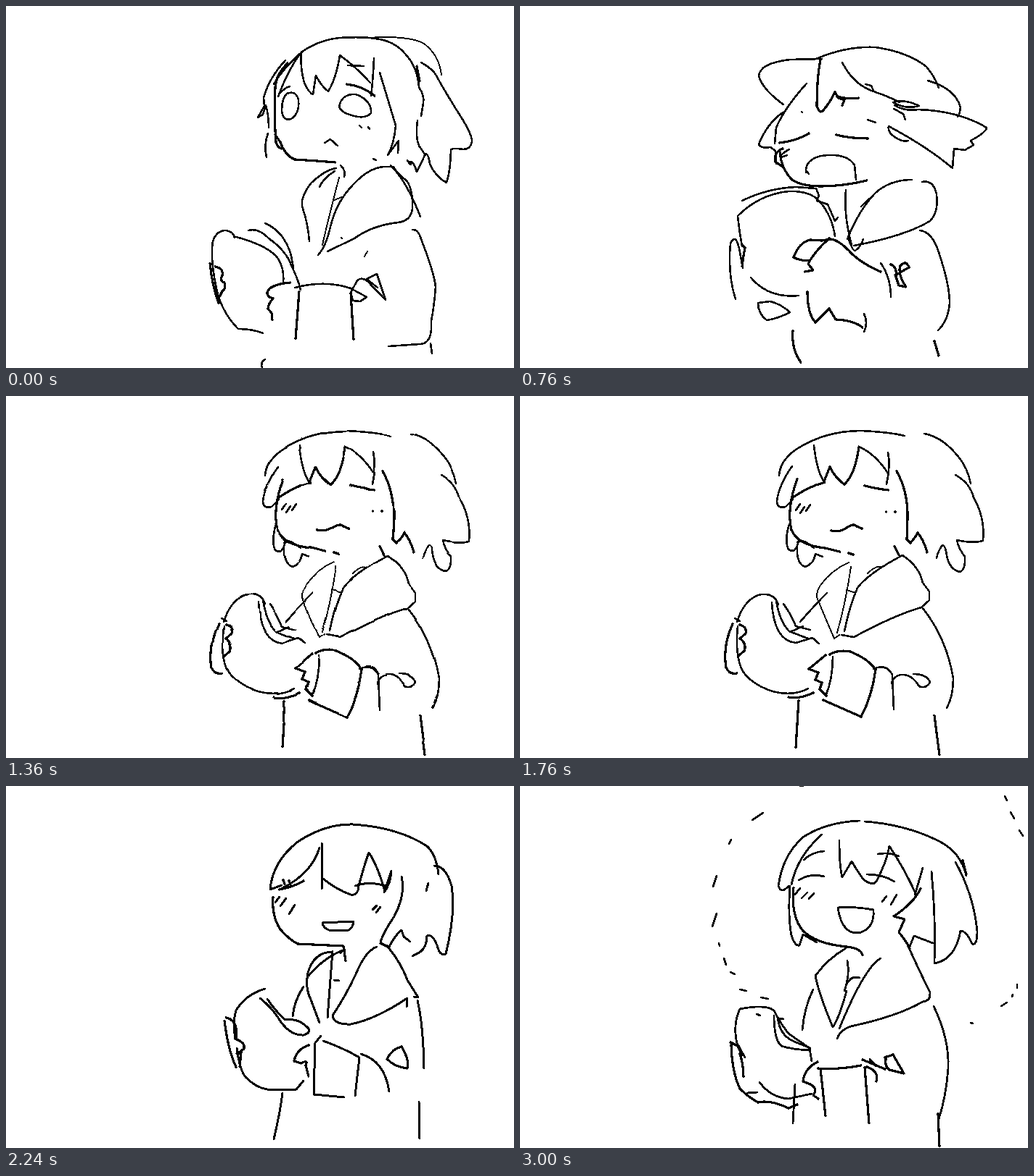
These frames come from a looping animation (700 px wide and 500 px high, 3120 ms). An HTML page without scripts:

```html
<!DOCTYPE html>
<html lang="en">
<head>
<meta charset="utf-8">
<title>Snack time</title>
<style>
html, body { margin: 0; width: 100%; height: 100%; overflow: hidden; background: #fff; }
svg { display: block; width: 700px; height: 500px; }
path { fill: none; stroke: #000; stroke-width: 2.6; stroke-linecap: round; stroke-linejoin: round; shape-rendering: crispEdges; }
#smile path { stroke-width: 3; }
#joy path { stroke-width: 2.8; }
path.b, #smile path.b, #joy path.b { stroke-width: 3.2; }
.t { stroke-width: 1.9; }

/* every drawing is held, then cut: step-end throughout */
#art, .pose, .chew, .burst { animation: 3.12s step-end infinite; }
.pose, .chew, .burst { opacity: 0; }
#art { animation-name: boil; }
#look { animation-name: look; }
#bite { animation-name: bite; }
#munch { animation-name: munch; }
#smile { animation-name: smile; }
#joy { animation-name: joy; }
#chew1 { animation-name: chew1; }
#chew2 { animation-name: chew2; }
#near { animation-name: near; transform-origin: 470px 180px; }
#far { animation-name: far; transform-origin: 480px 165px; }

@keyframes look { 0% { opacity: 1 } 16.666%, 100% { opacity: 0 } }
@keyframes bite { 0% { opacity: 0 } 16.666% { opacity: 1 } 32.051%, 100% { opacity: 0 } }
@keyframes munch { 0% { opacity: 0 } 32.051% { opacity: 1 } 64.102%, 100% { opacity: 0 } }
@keyframes smile { 0% { opacity: 0 } 64.102% { opacity: 1 } 75.641%, 100% { opacity: 0 } }
@keyframes joy { 0% { opacity: 0 } 75.641%, 100% { opacity: 1 } }
@keyframes chew1 { 0%, 39.743%, 56.41%, 100% { opacity: 0 } 32.051%, 48.717% { opacity: 1 } }
@keyframes chew2 { 0%, 48.717%, 64.102%, 100% { opacity: 0 } 39.743%, 56.41% { opacity: 1 } }
@keyframes near {
  0% { opacity: 0; transform: none }
  75.641% { opacity: 1; transform: scale(.94) }
  80.769% { opacity: 1; transform: none }
  84.615% { opacity: 1; transform: scale(1.15) }
  88.461%, 100% { opacity: 0; transform: none }
}
@keyframes far {
  0% { opacity: 0; transform: none }
  88.461% { opacity: 1; transform: scale(.88) }
  92.307% { opacity: 1; transform: scale(.94) }
  96.153%, 100% { opacity: 1; transform: none }
}
/* line wobble on every second drawing, eight per second */
@keyframes boil {
  0%, 7.692%, 16.666%, 24.358%, 32.051%, 39.743%, 48.717%, 56.41%, 64.102%, 71.794%, 80.769%, 88.461%, 96.153%, 100% { filter: none }
  3.846%, 11.538%, 20.512%, 28.205%, 35.897%, 43.589%, 52.564%, 60.256%, 67.948%, 75.641%, 84.615%, 92.307% { filter: url(#wobble) }
}
</style>
</head>
<body>
<svg viewBox="0 0 700 500" xmlns="http://www.w3.org/2000/svg">
<filter id="wobble" filterUnits="userSpaceOnUse" x="0" y="0" width="700" height="500" color-interpolation-filters="sRGB">
  <feTurbulence type="fractalNoise" baseFrequency=".015" seed="4" result="n"/>
  <feDisplacementMap in="SourceGraphic" in2="n" scale="7" xChannelSelector="R" yChannelSelector="G"/>
</filter>

<g id="art">
<g id="look" class="pose">
  <!-- hair -->
  <path d="M369 108Q382 86 407 64Q430 47 460 44Q490 42 509 45Q535 48 550 66Q567 84 569 112Q577 124 575 134L572 152M567 158Q564 180 569 193L578 206M572 78Q590 88 594 98Q607 122 630 158Q643 180 642 188Q640 198 630 198Q618 196 613 198Q613 225 607 244Q592 236 584 218Q582 204 578 204Q572 218 566 229Q562 215 557 215Q560 224 553 213"/>
  <path class="t" d="M509 43Q560 42 576 52Q597 68 600 95"/>
  <path d="M385 75Q362 100 355 127L356 138L347 154L354 150L358 137Q362 150 362 168M361 176Q355 192 359 209M407 63Q405 85 411 106Q418 121 423 122L427 96Q434 110 444 118Q455 100 460 68Q480 82 502 106M471 82L493 83M507 72Q506 100 503 124M405 66Q388 90 375 125M377 121Q384 113 391 111M515 92Q525 125 537 165Q535 190 526 206L541 186L540 203"/>
  <path class="b" d="M388 79Q372 95 371 112Q369 150 372 188Q374 196 380 197M566 83L570 104M469 108Q490 110 508 124M371 178L378 188Q384 206 398 212Q430 214 454 216"/>
  <!-- face -->
  <path d="M387 121Q400 116 403 130Q405 148 393 156Q382 160 380 145Q380 127 387 121M460 135Q465 121 482 122Q504 130 503 148Q495 156 480 152Q456 146 460 135M487 165L490 168M499 167L501 170M439 189L447 184L457 193M461 220Q469 228 466 236M506 211L510 213"/>
  <!-- hood -->
  <path d="M455 224Q440 226 420 245Q404 266 409 280Q416 300 418 325M453 228Q437 238 432 250M430 344Q441 332 447 305Q455 270 480 245Q500 224 520 222L534 222Q540 233 552 241Q561 254 560 280Q558 297 540 299Q505 303 480 321L443 339M530 220Q552 242 571 291"/>
  <path class="t" d="M459 237Q445 290 436 330M453 268L462 264M462 320L463 321M494 346L498 339"/>
  <!-- body and bread -->
  <path d="M560 309Q568 308 572 322Q590 368 592 388Q590 415 586 435Q588 467 570 467L527 470M585 466L587 480M354 452Q340 446 320 446Q299 425 291 395Q281 350 285 325Q290 310 303 310Q314 312 315 320M317 319Q355 329 372 345Q384 360 382 382M334 310Q348 306 362 321Q386 338 393 358Q402 376 406 392M357 300Q384 312 393 345L396 362"/>
  <path class="b" d="M281 355Q284 387 293 410M288 360Q300 362 298 372Q294 380 301 382Q304 390 298 394L295 400M392 382Q375 383 365 389Q356 396 363 402L368 404Q361 412 361 418L366 424L367 434M404 394L399 460M475 396L479 461"/>
  <path d="M398 389Q440 378 475 390L497 402L488 408L478 407L475 396L484 379Q490 374 498 380L523 406L511 370L497 377L512 389M357 488Q350 492 353 500"/>
</g>

<g id="bite" class="pose">
  <!-- hair and hat -->
  <path d="M363 136Q335 116 329 97Q330 79 372 74L416 73M408 73Q450 55 490 57Q536 64 560 84Q572 98 577 113M562 103Q600 114 607 140Q606 150 603 153M444 78Q460 110 490 119Q510 126 523 133M514 133Q530 128 550 138Q530 143 514 133M476 108L484 110L487 117M516 137Q530 146 549 143Q605 145 643 168Q643 174 621 186L625 192L613 199L598 197L596 224Q562 195 508 166Q506 175 518 182Q527 188 535 186M515 142L528 149L531 157"/>
  <path class="b" d="M414 74Q409 100 409 138Q413 150 418 144Q428 132 434 119L439 127L447 130L444 137M437 125Q450 129 467 127"/>
  <path d="M395 107Q365 140 353 168L351 190M362 147Q340 163 329 191Q331 197 345 195L352 200L353 218M371 198Q358 205 360 209L368 206"/>
  <!-- face -->
  <path class="b" d="M357 189Q380 187 398 176M436 178Q455 183 480 183M362 197Q349 202 352 215L363 223M358 201Q360 225 375 240Q388 249 415 249Q445 249 478 241"/>
  <path d="M394 230Q393 212 415 207Q450 202 461 220L463 240M394 227L398 232M388 146L389 147M479 157L490 161"/>
  <!-- hood and body -->
  <path d="M449 254Q446 290 457 330M451 322Q468 280 490 258Q510 240 540 240M554 243Q570 240 574 260Q577 285 565 297Q530 318 460 331M452 320Q458 338 462 338Q470 332 473 322M470 277L481 266M551 310Q568 312 577 340Q592 385 592 410Q590 435 576 448"/>
  <path class="b" d="M571 463L577 483M376 448Q374 475 387 492"/>
  <!-- bread and hands -->
  <path d="M306 269Q340 252 380 250L408 252L412 262L409 269L424 274L434 297L438 292M306 332Q302 310 300 290Q330 260 370 256Q400 255 413 270Q430 290 434 318M318 375Q342 404 384 400M297 405Q286 370 290 328Q297 313 302 335L307 362M328 410L345 408Q360 412 372 423Q355 432 340 434Q328 425 328 410"/>
  <path class="b" d="M306 330L310 334L308 345L306 360M400 352Q385 352 377 347Q385 326 400 323L416 324L428 322M426 321Q405 340 397 356L404 365L392 367M428 322Q440 323 458 343Q475 358 497 367M396 394Q396 425 407 437L426 418L435 433Q460 434 472 444M511 357Q520 360 518 374L522 386L532 388Q520 370 524 359Q532 350 536 361L517 372"/>
  <path d="M497 355Q511 375 511 402M474 425Q480 438 474 450"/>
</g>

<g id="munch" class="pose">
  <!-- hair -->
  <path d="M357 110Q358 90 380 74Q420 48 470 48Q510 50 530 55M557 52Q582 56 605 85Q617 100 621 121M600 109Q620 120 625 140Q641 168 638 200Q625 204 602 199Q604 210 613 222Q614 240 606 243Q592 240 588 220Q586 206 582 206Q576 214 574 224M375 97Q357 122 354 145Q354 156 366 153L376 143M371 177Q364 200 370 212Q380 219 384 200M382 210Q381 232 393 236Q405 232 407 218L417 222M382 202Q390 196 405 210"/>
  <path class="b" d="M519 104Q535 132 534 170L533 198L538 203Q545 195 548 189Q556 198 561 216M382 115Q367 155 374 185Q383 206 420 210L441 215M376 140Q400 124 418 120L427 98Q435 114 447 122Q462 108 467 70M475 124Q490 128 508 130M516 208L522 219"/>
  <path d="M405 68Q409 105 420 120M467 70Q490 80 508 108M507 78Q511 95 505 122M380 158L386 149M386 162L392 153M394 159L400 150"/>
  <path class="b" d="M504 160L505 160M516 160L518 160M453 217L459 219"/>
  <!-- hood and body -->
  <path class="t" d="M453 230Q430 240 415 260Q405 274 412 285Q420 305 433 335L440 330M456 236Q449 285 437 327M450 268L460 271M479 245Q490 234 497 236"/>
  <path d="M447 325Q454 290 465 265Q480 245 527 220Q550 235 555 258L564 270L564 282L553 292Q515 303 460 333L443 330M555 293Q588 335 597 390Q597 415 588 431M386 312Q405 290 423 272"/>
  <!-- bread -->
  <path d="M299 312Q308 283 328 275Q350 270 356 288M300 318Q296 360 307 380Q318 397 345 407Q375 416 397 404M347 285Q348 310 357 326Q365 339 380 341L403 334L412 342M353 283Q358 312 371 325L397 335M363 287Q375 304 380 318L400 323M372 326L390 318M296 307L303 311"/>
  <!-- hands and sleeves -->
  <path class="b" d="M293 315Q279 345 284 375Q288 385 299 383M303 316Q313 319 311 328L303 335Q313 342 309 352L302 358M421 358L398 377L411 382L407 392L416 396L413 405L422 414M427 357Q438 350 455 353Q480 363 490 378Q485 415 470 443L418 420M370 416Q385 419 404 410"/>
  <path d="M431 360Q431 390 422 412M487 377Q505 369 513 385L515 433M512 397Q514 387 525 385Q540 384 550 401Q560 405 565 395Q560 384 542 384"/>
  <g id="chew1" class="chew"><path class="b" d="M430 179Q437 186 444 185Q454 174 460 179L469 182M385 420L376 482M570 441Q575 465 573 494"/></g>
  <g id="chew2" class="chew"><path class="b" d="M429 186Q440 189 450 182Q460 175 464 180L471 183M384 420L380 486M571 441L578 496"/></g>
</g>

<g id="smile" class="pose">
  <!-- hair -->
  <path d="M364 143Q367 105 402 77Q440 52 478 53Q540 57 580 83Q593 95 596 122M590 110Q606 110 614 138Q620 175 606 232Q598 236 594 220Q588 204 580 207Q580 222 571 229L560 235M545 125Q551 150 535 180Q517 207 516 217L528 222Q536 206 545 199L548 208L557 215M364 143L380 137M582 134L579 145"/>
  <path d="M381 141Q422 120 432 85M435 79L435 142M437 128Q455 143 475 150Q485 152 486 138Q495 105 500 92Q512 110 522 145L531 117Q530 135 521 147M481 138Q500 131 523 138"/>
  <path class="b" d="M376 143Q395 140 410 131M382 130L384 135M390 131L392 136"/>
  <!-- face -->
  <path d="M377 153L371 161M386 155L378 166M398 164L390 177M511 165L505 171M516 167L510 175"/>
  <path class="b" d="M368 153Q366 180 378 198Q390 212 402 218L465 221L468 242M466 226L461 230M516 217L528 223"/>
  <path d="M436 189L479 187Q478 196 472 199L445 199Q437 196 436 189"/>
  <!-- hood and body -->
  <path d="M467 226Q440 235 417 262M449 229Q424 230 416 258Q412 280 420 295L432 327M450 228L443 320M511 222Q495 228 482 260Q468 290 450 317Q452 330 475 329Q510 322 553 293L552 305M526 222Q545 245 553 268L568 292L562 291M567 296Q575 330 576 390M452 268L459 269M410 277Q397 297 395 318M569 436L570 487M381 424Q378 450 369 488"/>
  <!-- bread and hands -->
  <path d="M357 280Q330 288 317 310Q312 325 316 350M350 293Q366 306 375 320Q390 345 410 344Q420 341 417 335Q404 320 385 323Q372 312 360 294M318 362Q322 392 330 402Q345 417 360 419L400 419L410 407"/>
  <path class="b" d="M301 324Q306 365 317 388M303 320Q315 322 317 335L318 350Q330 355 328 363L318 370L324 368L322 388M417 358Q400 364 397 380L407 383Q417 377 413 386L417 401"/>
  <path d="M434 345L426 355L424 426L466 430M437 352Q465 362 487 375L481 428M489 370Q522 380 528 422"/>
  <path class="b" d="M525 377Q532 363 545 360Q556 378 553 390Q535 388 525 377"/>
</g>

<g id="joy" class="pose">
  <!-- hair -->
  <path d="M388 72Q420 50 468 48M475 49Q530 53 575 75Q607 90 615 124M600 105Q625 150 630 200Q630 221 623 218Q615 200 607 200Q600 240 571 245Q573 180 567 118M390 71Q362 95 356 138Q360 150 370 138M416 67Q382 97 374 136M372 138Q369 180 374 206Q379 222 385 220L390 205L409 216"/>
  <path d="M440 75Q440 110 444 126L457 104Q465 118 473 129Q488 140 492 130Q505 105 509 83Q530 115 545 148M555 113Q548 138 544 150M537 222L543 207L569 217"/>
  <path class="b" d="M552 142Q542 162 515 180L530 184L522 202Q532 214 537 224M377 140Q373 180 390 200Q408 218 450 222Q470 224 472 234M610 103L615 122"/>
  <!-- face -->
  <path d="M384 130Q400 120 419 125M478 122Q500 122 516 132M391 102Q403 91 419 90M493 94Q508 91 522 97M386 141L379 150M396 147L388 155M405 148L398 156M505 152L499 160M519 150L511 164"/>
  <path d="M438 168Q460 166 487 171Q489 195 470 202Q444 208 438 168"/>
  <!-- hood and body -->
  <path d="M449 224Q425 238 407 262Q411 285 431 333Q440 320 450 283M497 238Q475 250 440 335M451 241Q455 262 447 283M450 274Q456 261 468 265M533 217Q550 255 565 285Q566 297 555 298Q520 318 460 331Q442 335 437 349M404 281Q392 305 389 337M570 304Q592 350 590 390Q587 430 577 460"/>
  <path class="b" d="M576 452L578 498"/>
  <!-- bread and hands -->
  <path d="M303 308Q338 301 350 310Q357 325 370 342L399 362L402 380M303 308Q293 330 299 355L310 375M350 317Q350 350 360 359Q375 364 400 365M355 320Q358 345 378 353L400 362M357 321L363 322M326 315L331 317M330 409Q345 430 370 432L402 425M313 424L327 423M379 412L376 466"/>
  <path class="b" d="M290 354L300 359L306 372M291 357Q292 395 303 418Q315 430 328 437Q345 433 370 445L382 440M303 370Q308 385 308 402M410 381Q392 390 390 408L400 412Q411 418 404 427L411 432"/>
  <path class="b" d="M414 390L421 456M410 390Q440 392 470 386M475 388L481 466M472 378L503 391M482 378L490 386M478 388Q495 394 491 408"/>
  <path class="b" d="M503 375L514 371L529 397L509 392Q501 386 505 374"/>
</g>
</g>

<g id="near" class="burst">
  <path class="b" d="M285 104L291 113M270 157L270 170M258 218L264 220M300 206L296 222M312 235L309 244M333 255L337 267M310 53L312 61M330 38L336 46M353 14L359 28M407 5L413 12M446 5L447 11M493 5L494 12M503 34L506 40M545 5L547 11"/>
  <path class="b" d="M604 24L614 26M623 38L638 34M641 62L652 62M659 100L676 99M669 149L679 153M676 210L678 212M668 226L669 227M655 240L656 241M634 261L643 267"/>
</g>
<g id="far" class="burst">
  <path d="M386 0L390 0M335 37L320 47M291 74L288 80M271 124L266 139M271 176L265 194M274 217L275 221M281 238L284 247M290 257L296 260M303 281L312 283M332 292L342 294M668 14L671 20M676 36L681 45M688 61L693 69M685 274L685 279M679 288L678 291M663 304L671 299M621 327L624 328"/>
</g>
</svg>
</body>
</html>
```
